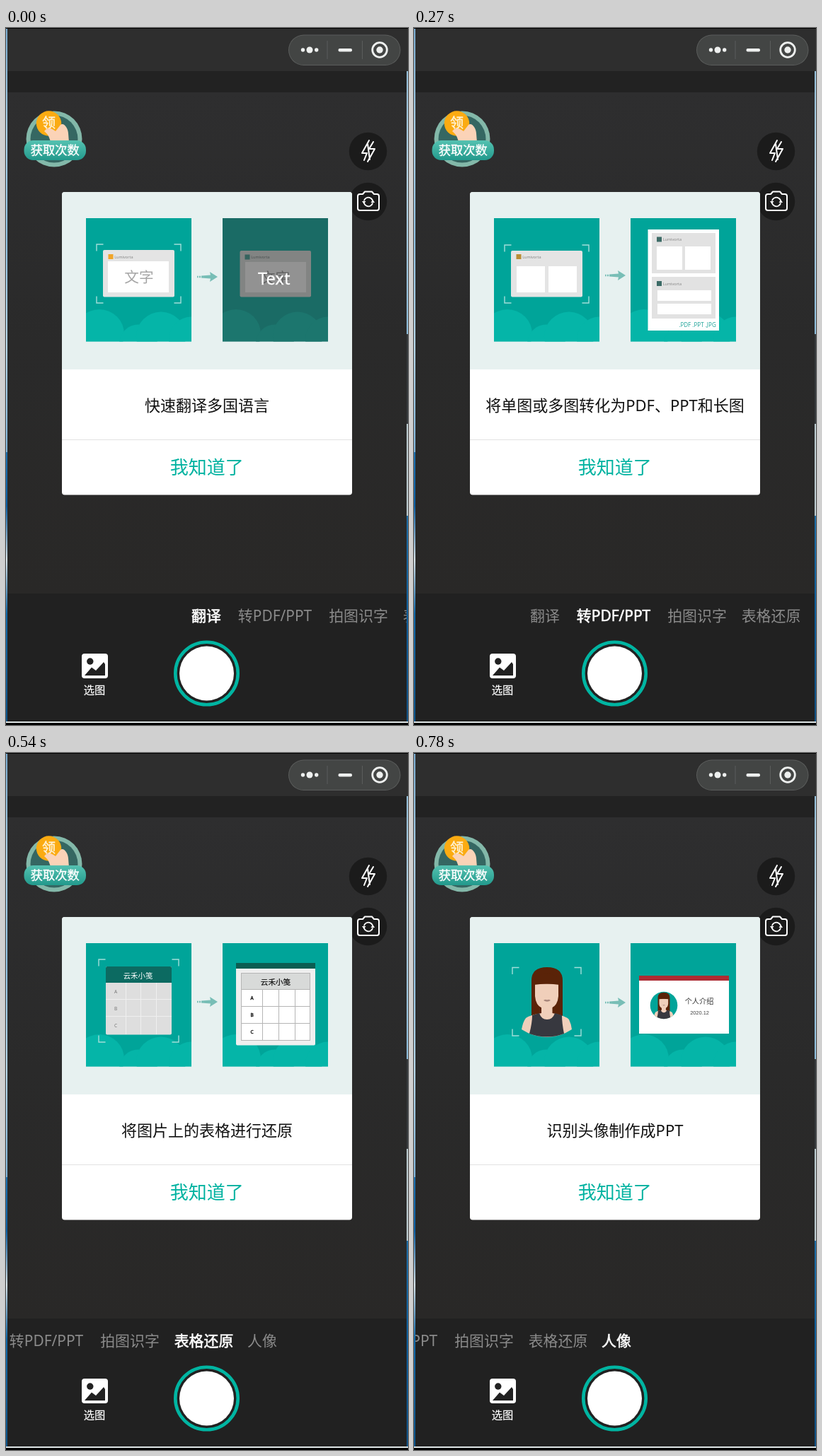
An HTML page with a canvas that plays this animation: 568 px wide and 986 px high, repeating every 0.88 s.

```html
<!DOCTYPE html>
<html lang="zh-CN">
<head>
<meta charset="utf-8">
<style>
html, body { margin: 0; width: 100%; height: 100%; overflow: hidden; background: #000; }
canvas { display: block; }
</style>
</head>
<body>
<canvas id="stage" width="568" height="986"></canvas>
<script>
const ctx = document.getElementById('stage').getContext('2d');
const FONT = '"Noto Sans", "Noto Sans CJK SC", "Noto Sans CJK", sans-serif';
const TEAL = '#00a499', CLOUD = '#05b5a8', DARK = '#1a6b65', DARK_CLOUD = '#1c766e';
const BRAND = 'Lumivorta', HELPER = '云禾小笺';
const LOOP = 880;

const rect = (x1, y1, x2, y2, fill) => {
  ctx.fillStyle = fill;
  ctx.fillRect(x1, y1, x2 - x1, y2 - y1);
};

const round = (x1, y1, x2, y2, r, fill) => {
  ctx.fillStyle = fill;
  ctx.beginPath();
  ctx.roundRect(x1, y1, x2 - x1, y2 - y1, r);
  ctx.fill();
};

const disc = (x, y, r, fill) => {
  ctx.fillStyle = fill;
  ctx.beginPath();
  ctx.arc(x, y, r, 0, Math.PI * 2);
  ctx.fill();
};

const ring = (x, y, r, width, color, from = 0, to = Math.PI * 2) => {
  ctx.strokeStyle = color;
  ctx.lineWidth = width;
  ctx.beginPath();
  ctx.arc(x, y, r, from, to);
  ctx.stroke();
};

const stroke = (d, color, width) => {
  ctx.strokeStyle = color;
  ctx.lineWidth = width;
  ctx.stroke(new Path2D(d));
};

const shape = (d, fill) => {
  ctx.fillStyle = fill;
  ctx.fill(new Path2D(d));
};

const vertical = (y1, y2, ...colors) => {
  const g = ctx.createLinearGradient(0, y1, 0, y2);
  colors.forEach((c, i) => g.addColorStop(i / (colors.length - 1), c));
  return g;
};

// Text centred vertically on cy; weight thickens the glyphs a little.
function text(s, x, cy, size, color, { align = 'center', weight = 0, font = FONT } = {}) {
  ctx.font = `${size}px ${font}`;
  ctx.textAlign = align;
  ctx.fillStyle = color;
  const y = cy + size * 0.365;
  ctx.fillText(s, x, y);
  if (weight) {
    ctx.strokeStyle = color;
    ctx.lineWidth = weight;
    ctx.strokeText(s, x, y);
  }
}

function edges() {
  rect(0, 0, 568, 986, '#000');
  rect(0, 1, 2, 600, vertical(1, 600, '#78a9cd', '#a9cfe5', '#8fc0e0', '#b5d5e6', '#7fb3d8'));
  rect(0, 600, 2, 981, vertical(600, 981, '#1b6fae', '#0b5fa4', '#d3dfe4', '#0e67a8', '#135f98', '#0a5288'));
  rect(566, 1, 568, 433, vertical(1, 433, '#86b4d2', '#b4d2e2', '#8bbad8'));
  rect(566, 433, 568, 560, '#34383a');
  rect(566, 560, 568, 690, '#b9c8cc');
  rect(566, 690, 568, 981, vertical(690, 981, '#1d6ca4', '#0c5b98', '#104e80'));
  rect(0, 981, 568, 983, '#dfe5e6');
}

function header() {
  rect(2, 1, 568, 61, '#2e2e2e');
  rect(2, 61, 566, 91, '#222');
  round(399, 9.5, 557.5, 53, 21.7, '#5b5d5c');
  round(400, 10.5, 556.5, 52, 20.7, '#434544');
  rect(453.5, 18, 454.5, 44, '#5b5d5c');
  rect(503, 18, 504, 44, '#5b5d5c');
  const ink = '#eef0ef';
  disc(419.5, 31, 2.7, ink);
  disc(429, 31, 4.5, ink);
  disc(438.7, 31, 2.7, ink);
  round(469.5, 29, 489, 33.5, 2, ink);
  ring(528, 31, 10.3, 2.8, ink);
  disc(528, 31, 4.7, ink);
}

function badge() {
  disc(68, 157, 39.5, '#83b8a9');
  disc(68, 157, 33.5, '#356762');
  disc(60.5, 135, 17.7, '#fbab12');
  text('领', 60.5, 134.5, 19, '#fff3d8', { weight: 0.5 });
  shape('M54 146 C60 139 65 143 70 146 L77 137 C82 133 88 143 88 149 L89 162 H66 C60 160 64 154 54 146Z', '#fbd3b7');
  round(25.5, 159, 113, 187, 13, vertical(159, 187, '#55c2b1', '#22998c'));
  text('获取次数', 69.3, 173, 17.3, '#fff', { weight: 0.4 });
}

function sideButtons() {
  disc(511.5, 174.5, 26.7, '#1b1b1b');
  disc(511.5, 245.5, 26.7, '#1b1b1b');
  ctx.lineJoin = ctx.lineCap = 'round';
  stroke('M513 159 L503 177 H510 L506 187 M519 161 L513 171 H521 L511 189 M511 164 L514 186', '#fff', 2);
  stroke('M500 235 H504 L507 231.5 H517 L520 235 H524 Q527 235 527 238 V255 Q527 258 524 258 H500 Q497 258 497 255 V238 Q497 235 500 235Z', '#fff', 2);
  ring(512, 246, 6.3, 1.8, '#fff', 0.35, 2.75);
  ring(512, 246, 6.3, 1.8, '#fff', 3.5, 5.9);
  ctx.lineJoin = 'miter';
  ctx.lineCap = 'butt';
  shape('M503 245 H508.5 L505.7 249Z M515.5 247 H521 L518.3 243Z', '#fff');
}

function footer() {
  rect(2, 800, 566, 981, '#212121');
  round(107, 885, 144, 920, 4, '#fff');
  disc(118.8, 896, 4.7, '#212121');
  shape('M111 916 L121 904.5 L127 909 L138 897 L140 900 V916Z', '#212121');
  text('选图', 125, 936.5, 15.3, '#fff', { weight: 0.2 });
  ring(283.5, 913, 44.2, 4.6, '#00b5a2');
  disc(283.5, 913, 38.5, '#fff');
}

const TABS = [['翻译', 0], ['转PDF/PPT', 97], ['拍图识字', 215], ['表格还原', 319.5], ['人像', 402]];

function tabs(active, offset) {
  ctx.save();
  ctx.beginPath();
  ctx.rect(2, 800, 564, 60);
  ctx.clip();
  TABS.forEach(([name, x], i) => {
    const on = i === active;
    text(name, offset + x, 831, 20.9, on ? '#fff' : '#8b8b8b', { weight: on ? 0.6 : 0 });
  });
  ctx.restore();
}

function card(x, y, w, h, dark) {
  const k = w / 149;
  ctx.save();
  ctx.beginPath();
  ctx.rect(x, y, w, h);
  ctx.clip();
  rect(x, y, x + w, y + h, dark ? DARK : TEAL);
  for (const [cx, cy, r] of [[19, -10.5, 35], [74, 3, 27], [106, -7, 35], [149, -3, 32]])
    disc(x + cx * k, y + h + cy * k, r * k, dark ? DARK_CLOUD : CLOUD);
  ctx.restore();
}

function bigCards(rightDark) {
  card(113, 269, 149, 174.5);
  card(306, 269, 149, 174.5, rightDark);
}

function brackets(x1, y1, x2, y2, color = '#a3ded9', n = 9.5) {
  stroke(`M${x1} ${y1 + n}V${y1}H${x1 + n} M${x2 - n} ${y1}H${x2}V${y1 + n}
    M${x2} ${y2 - n}V${y2}H${x2 - n} M${x1 + n} ${y2}H${x1}V${y2 - n}`, color, 1.4);
}

function arrow(y) {
  const c = '#78beb6';
  rect(270, y - 1.3, 271.7, y + 1.3, c);
  rect(273, y - 1.3, 275, y + 1.3, c);
  shape(`M276 ${y - 1.5} L289 ${y - 2.4} L288 ${y - 7} L299 ${y} L288 ${y + 7} L289 ${y + 2.4} L276 ${y + 1.5}Z`, c);
}

function brand(x, y, mark, color = '#888') {
  rect(x, y - 3.5, x + 7, y + 3.5, mark);
  text(BRAND, x + 8.7, y, 5.5, color, { align: 'left' });
}

function translateArt() {
  bigCards(true);
  brackets(128, 306, 247, 389);
  round(137, 314, 238, 380.5, 2, '#e4e4e4');
  rect(144, 330, 230, 374, '#fff');
  brand(144.5, 323.5, '#f0a52a');
  text('文字', 188, 352.5, 20.7, '#a5a5a5');
  arrow(352);
  round(330.5, 315, 431, 380.5, 2, '#828483');
  rect(338, 331, 424, 374, '#929292');
  brand(337.5, 324, '#35635e', '#4c5352');
  text('文字', 380.5, 353, 20.7, '#626262');
  text('Text', 378.7, 354, 23.7, '#fff', { weight: 0.3 });
}

function convertArt() {
  bigCards();
  brackets(128, 307, 247, 389);
  round(137, 315, 238, 380.5, 2, '#e4e4e4');
  brand(144.5, 323.5, '#b98d35');
  rect(145, 337, 185, 374, '#fff');
  rect(190, 337, 230, 374, '#fff');
  arrow(350);
  rect(330.5, 285, 431, 428, '#fff');
  rect(336, 290, 426, 347, '#e2e2e2');
  rect(336, 352, 426, 411, '#e2e2e2');
  brand(343, 299, '#3c6b66');
  brand(343, 361.5, '#3c6b66');
  rect(343, 309, 379, 342, '#fff');
  rect(383, 309, 419, 342, '#fff');
  rect(344, 371, 420, 386, '#fff');
  rect(344, 390, 420, 405, '#fff');
  text('.PDF .PPT .JPG', 400.5, 420, 8, '#27a79d');
}

function handwriting(dx, color) {
  ctx.save();
  ctx.translate(dx, 0);
  ctx.lineCap = ctx.lineJoin = 'round';
  stroke(`M189 331 L193 335 M182 337 Q179 342 181 346 M182 341 Q196 338 206 338 Q211 338 204 345
    M187 348 Q193 345 199 345 Q201 346 192 354 Q199 359 196 367 Q194 375 187 367
    M179 362 Q194 357 211 355`, color, 1.7);
  ctx.restore();
}

function recogniseArt() {
  card(127, 288.5, 135.5, 142.5);
  card(305.5, 288.5, 135.5, 142.5, true);
  brackets(141, 319, 249, 387, '#a3ded9', 8);
  rect(149, 325, 241, 379.5, '#fff');
  handwriting(0, '#111');
  arrow(356.5);
  brackets(321, 319, 430, 387, '#5f9a95', 8);
  rect(329, 325, 420, 379.5, '#979797');
  handwriting(180, '#222');
  text('字', 374, 351, 20, '#fff', { weight: 0.3 });
}

function grid(xs, ys, x1, y1, x2, y2, color) {
  stroke(xs.map(x => `M${x} ${y1}V${y2}`).join('') + ys.map(y => `M${x1} ${y}H${x2}`).join(''), color, 1);
}

function tableArt() {
  bigCards();
  brackets(131, 292, 244, 409);
  round(141, 302, 234, 398.5, 2, '#dedede');
  round(141, 302, 234, 325, [2, 2, 0, 0], '#0c6a61');
  text(HELPER, 186.5, 315, 10.4, '#fff');
  grid([169.5, 190.5, 212.5], [348.5, 372.5], 141, 325, 234, 398, '#efefef');
  arrow(352);
  round(325, 297, 437, 413.5, 2, '#efefef');
  rect(325, 297, 437, 305, '#0b5d52');
  rect(332, 312, 430, 406, '#fff');
  rect(332, 312, 430, 334, '#d8dad9');
  grid([362.5, 385.5, 408.5], [358.5, 382.5], 332, 334, 430, 406, '#b5b5b5');
  grid([332.5, 429.5], [311.5, 334.5, 406.5], 332, 312, 430, 406, '#b5b5b5');
  text(HELPER, 381, 324, 10.6, '#111', { weight: 0.2 });
  [...'ABC'].forEach((letter, i) => {
    text(letter, 155, 338 + i * 24, 6.5, '#777');
    text(letter, 347.5, 347 + i * 24, 6.5, '#111', { weight: 0.4 });
  });
}

function portrait(x, y, k) {
  const skin = '#f0cfba';
  ctx.save();
  ctx.translate(x, y);
  ctx.scale(k, k);
  ctx.translate(-188, -352);
  shape('M166 376 V322 Q166 303 188 303 Q210 303 210 322 V376Z', '#5a2308');
  shape('M180 352 H195.5 V368 Q215 372 219 377 Q222 383 223 391 Q206 402 188 402 Q169 402 152 391 Q154 380 158 375 Q163 371 180 368Z', skin);
  shape('M167 371 L177 368 Q180 377 188 377 Q196 377 199 368 L209 371 Q209 382 212 397 Q188 406 163 397 Q167 382 167 371Z', '#37383f');
  shape('M171 325 Q188 328 204 325 V344 Q203 357 194 361 Q188 365 181 361 Q172 357 171 344Z', skin);
  shape('M169 328 Q171 313 188 312 Q205 313 206 328 Q188 325 169 328Z', '#5a2308');
  shape('M183 350 Q185.5 348 188 349.3 Q190.500 348 193 350 Q188 353.500 183 350Z', '#a8877c');
  ctx.restore();
}

function portraitArt() {
  bigCards();
  portrait(188, 352, 1);
  brackets(139, 303.5, 236, 400);
  arrow(353);
  rect(318, 315, 445, 397, '#fff');
  rect(318, 315, 445, 322, '#ad2b32');
  disc(353, 357, 19.3, TEAL);
  ctx.save();
  ctx.beginPath();
  ctx.arc(353, 357, 19.3, 0, Math.PI * 2);
  ctx.clip();
  portrait(353, 357.5, 0.385);
  ctx.restore();
  text('个人介绍', 403, 351.500, 10.2, '#333');
  text('2020.12', 403.5, 367.5, 7.4, '#444', { font: '"Liberation Sans", Arial, sans-serif' });
}

function chips() {
  round(185, 744, 283, 780, 18, '#181818');
  round(286, 744, 384, 780, 18, '#181818');
  text('印刷字体', 234, 762.500, 19.3, '#2cc8b2');
  text('手写英文', 334.5, 762.500, 19.3, '#fff');
}

function dialog(title, art) {
  round(79, 232, 489, 660.5, 4, '#fff');
  round(79, 232, 489, 483, [4, 4, 0, 0], '#e7f1f0');
  rect(79, 582, 489, 583, '#e2e2e2');
  art();
  text(title, 284, 534, 22, '#111');
  text('我知道了', 283.7, 622, 26, '#00b2a0');
}

const SCENES = [
  { start: 0, offset: 283, title: '快速翻译多国语言', art: translateArt },
  { start: 190, offset: 185, title: '将单图或多图转化为PDF、PPT和长图', art: convertArt },
  { start: 360, offset: 67, title: '手写识别上线，每日限量体验', art: recogniseArt, extra: chips },
  { start: 540, offset: -40, title: '将图片上的表格进行还原', art: tableArt },
  { start: 700, offset: -116, title: '识别头像制作成PPT', art: portraitArt },
];

function draw(time) {
  const index = SCENES.findLastIndex(s => s.start <= time);
  const scene = SCENES[index];
  edges();
  header();
  rect(2, 91, 566, 800, vertical(91, 800, '#2e2e2f', '#2a2a2a', '#292827'));
  badge();
  sideButtons();
  dialog(scene.title, scene.art);
  scene.extra?.();
  footer();
  tabs(index, scene.offset);
}

const begin = performance.now();
function tick() {
  draw((performance.now() - begin) % LOOP);
  requestAnimationFrame(tick);
}
tick();
</script>
</body>
</html>
```
